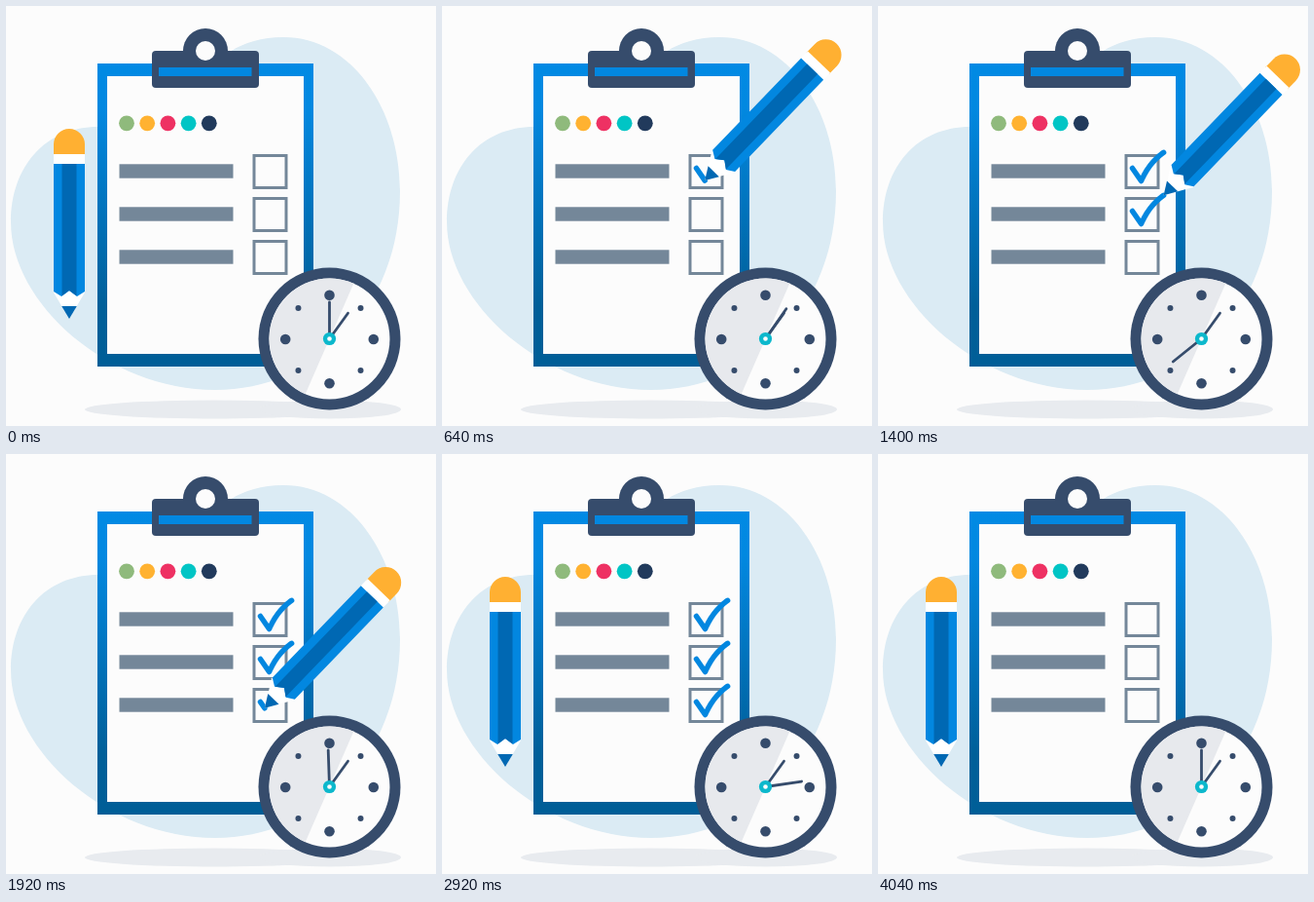
These frames come from a looping animation (442x431 px, 5 s). An HTML page with a canvas:

```html
<!DOCTYPE html>
<html lang="en">
<head>
<meta charset="utf-8">
<title>Checklist</title>
<style>
html, body { margin: 0; width: 100%; height: 100%; overflow: hidden; background: #fcfcfc; }
canvas { display: block; }
</style>
</head>
<body>
<canvas id="stage" width="442" height="431"></canvas>
<script>
const ctx = document.getElementById('stage').getContext('2d');
const LOOP = 5000, STEP = 40, TAU = Math.PI * 2;
const PAPER = '#fcfcfc', NAVY = '#364c6c', BLUE = '#0287e0', DEEP = '#0068b3', GREY = '#748799';
const ROWS = [0, 44, 88];
const HOME = { x: 65, y: 321, a: 0 };
const TILT = 44 * Math.PI / 180;

const blob = new Path2D('M5 222C5 165 40 124 95 124C190 124 195 32 285 32C355 32 405 105 405 190C405 310 320 394 215 394C105 394 5 305 5 222Z');

const lerp = (a, b, u) => a + (b - a) * u;
const span = (t, a, b) => Math.min(1, Math.max(0, (t - a) / (b - a)));
const smooth = u => u * u * (3 - 2 * u);

// Cubic bezier timing (.67, 0, .68, 1)
function swing(u) {
  let lo = 0, hi = 1;
  for (let i = 0; i < 24; i++) {
    const s = (lo + hi) / 2, r = 1 - s;
    const x = 3 * s * r * r * 0.67 + 3 * s * s * r * 0.68 + s * s * s;
    if (x < u) lo = s; else hi = s;
  }
  return smooth(lo);
}

// Tick stroke: a straight fall, then a curved rise
const tick = [[261.5, 166.5], [270.5, 179.5]];
for (let i = 1; i <= 12; i++) {
  const u = i / 12, r = 1 - u;
  tick.push([r * r * 270.5 + 2 * r * u * 279 + u * u * 293.6,
             r * r * 179.5 + 2 * r * u * 160.5 + u * u * 150.3]);
}
const dist = (p, q) => Math.hypot(q[0] - p[0], q[1] - p[1]);
const tickLength = tick.reduce((sum, p, i) => i ? sum + dist(tick[i - 1], p) : 0, 0);

function tickPart(u) {
  let left = u * tickLength;
  const pts = [tick[0]];
  for (let i = 1; i < tick.length; i++) {
    const p = tick[i - 1], q = tick[i], d = dist(p, q);
    if (left < d) {
      pts.push([lerp(p[0], q[0], left / d), lerp(p[1], q[1], left / d)]);
      break;
    }
    pts.push(q);
    left -= d;
  }
  return pts;
}

const strokes = [[560, 840], [1140, 1400], [1880, 2160]];
const progress = t => strokes.map(([a, b]) => span(t, a, b));

function poseAt(row, u) {
  const p = tickPart(u).pop();
  return { x: p[0], y: p[1] + ROWS[row], a: TILT };
}

function mix(p, q, u) {
  const k = smooth(u);
  return { x: lerp(p.x, q.x, k), y: lerp(p.y, q.y, k), a: lerp(p.a, q.a, k) };
}

function pencilPose(t) {
  const done = progress(t);
  if (t < 560) return mix(HOME, poseAt(0, 0), span(t, 0, 560));
  if (t < 900) return poseAt(0, done[0]);
  if (t < 1140) return mix(poseAt(0, 1), poseAt(1, 0), span(t, 900, 1140));
  if (t < 1620) return poseAt(1, done[1]);
  if (t < 1880) return mix(poseAt(1, 1), poseAt(2, 0), span(t, 1620, 1880));
  if (t < 2240) return poseAt(2, done[2]);
  return mix(poseAt(2, 1), HOME, span(t, 2240, 2840));
}

function rect(x, y, w, h, color) {
  ctx.fillStyle = color;
  ctx.fillRect(x, y, w, h);
}

function disc(x, y, r, color) {
  ctx.fillStyle = color;
  ctx.beginPath();
  ctx.arc(x, y, r, 0, TAU);
  ctx.fill();
}

function oval(x, y, rx, ry, color) {
  ctx.fillStyle = color;
  ctx.beginPath();
  ctx.ellipse(x, y, rx, ry, 0, 0, TAU);
  ctx.fill();
}

function poly(pts, color) {
  ctx.fillStyle = color;
  ctx.beginPath();
  pts.forEach(p => ctx.lineTo(p[0], p[1]));
  ctx.fill();
}

function line(pts, width, color) {
  ctx.strokeStyle = color;
  ctx.lineWidth = width;
  ctx.lineCap = ctx.lineJoin = 'round';
  ctx.beginPath();
  pts.forEach(p => ctx.lineTo(p[0], p[1]));
  ctx.stroke();
}

function sheet(done) {
  rect(104, 72, 202, 285, PAPER);
  ['#8fba7c', '#ffb231', '#ee3163', '#00c5c5', '#213a5c'].forEach((c, i) => disc(124 + i * 21.2, 120.3, 7.9, c));
  ROWS.forEach((dy, i) => {
    rect(116.5, 162.3 + dy, 117, 14.4, GREY);
    ctx.strokeStyle = GREY;
    ctx.lineWidth = 3;
    ctx.lineJoin = 'miter';
    ctx.strokeRect(255, 153.5 + dy, 33, 33);
    if (done[i] > 0) line(tickPart(done[i]).map(p => [p[0], p[1] + dy]), 5.5, BLUE);
  });
}

function board(t) {
  const g = ctx.createLinearGradient(0, 59, 0, 370);
  g.addColorStop(0, '#018ae4');
  g.addColorStop(0.15, '#0288e0');
  g.addColorStop(0.8, '#005f99');
  g.addColorStop(1, '#005e97');
  rect(94, 59, 222, 311, g);
  const blank = [0, 0, 0];
  if (t < 3400) {
    const k = smooth(span(t, 2920, 3400));
    if (k > 0) sheet(blank);
    ctx.save();
    ctx.globalAlpha = 1 - k;
    ctx.translate(0, 115 * k);
    sheet(progress(t));
    ctx.restore();
  } else sheet(blank);
}

function clip() {
  disc(205, 46, 23, NAVY);
  ctx.fillStyle = NAVY;
  ctx.beginPath();
  ctx.roundRect(150, 46, 110, 38, 4);
  ctx.fill();
  disc(205, 46, 10, PAPER);
  rect(157, 63, 95.5, 9, BLUE);
}

function clock(t) {
  ctx.save();
  ctx.translate(332.5, 341.5);
  disc(0, 0, 73, NAVY);
  disc(0, 0, 62, PAPER);
  const a = 23.6 * Math.PI / 180;
  ctx.fillStyle = '#e7e9ed';
  ctx.beginPath();
  ctx.arc(0, 0, 62, Math.PI / 2 + a, Math.PI * 1.5 + a);
  ctx.fill();
  for (let i = 0; i < 4; i++) {
    const b = i * Math.PI / 2;
    disc(45.3 * Math.cos(b), 0.5 + 45.3 * Math.sin(b), 5.3, NAVY);
    disc(45.3 * Math.cos(b + Math.PI / 4), 0.5 + 45.3 * Math.sin(b + Math.PI / 4), 3, NAVY);
  }
  const turn = t < 4000 ? swing(t % 2000 / 2000) * TAU : 0;
  line([[0, 0], [19, -26.3]], 2.8, NAVY);
  line([[0, 0], [37.5 * Math.sin(turn), -37.5 * Math.cos(turn)]], 2.8, NAVY);
  disc(0, 0, 6.6, '#0cb8cc');
  disc(0, 0, 2.3, PAPER);
  ctx.restore();
}

function pencil({ x, y, a }) {
  ctx.save();
  ctx.translate(x, y);
  ctx.rotate(a);
  ctx.fillStyle = '#ffb032';
  ctx.beginPath();
  ctx.roundRect(-16, -195, 32, 28, [16, 16, 0, 0]);
  ctx.fill();
  rect(-16, -169, 32, 10, '#ffffff');
  poly([[-16, -32], [16, -32], [16, -27], [0, 0], [-16, -27]], '#ffffff');
  poly([[-16, -159], [16, -159], [16, -28], [8, -23], [0, -29], [-8, -23], [-16, -28]], BLUE);
  poly([[-7.5, -159], [7.5, -159], [7.5, -23.4], [0, -29], [-7.5, -23.4]], DEEP);
  poly([[-7.8, -13], [7.8, -13], [0, 0]], DEEP);
  ctx.restore();
}

function draw(t) {
  rect(0, 0, 442, 431, PAPER);
  ctx.fillStyle = '#dbebf4';
  ctx.fill(blob);
  oval(214, 414, 133, 9.5, '#e8ebef');
  oval(333, 414, 73, 9.5, '#e8ebef');
  board(t);
  clip();
  clock(t);
  pencil(pencilPose(t));
}

function tickFrame(now) {
  draw(Math.floor(now % LOOP / STEP) * STEP);
  requestAnimationFrame(tickFrame);
}
draw(0);
requestAnimationFrame(tickFrame);
</script>
</body>
</html>
```
